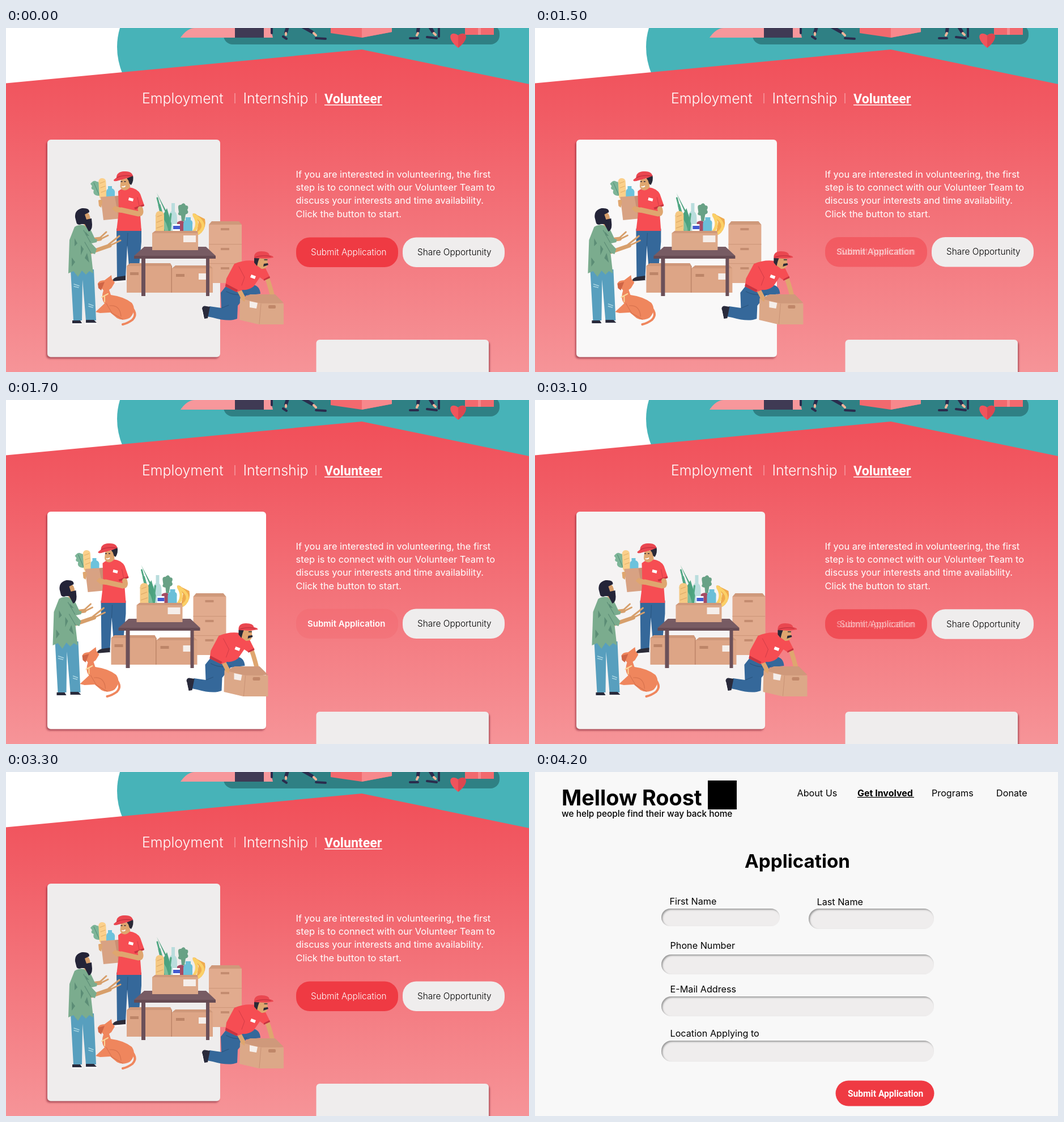
Write an HTML page that moves like this. It is 923 by 607 pixels and loops after 6000 ms.

```html
<!DOCTYPE html>
<html lang="en">
<meta charset="utf-8">
<title>Volunteer page</title>
<style>
html, body { margin: 0; width: 100%; height: 100%; overflow: hidden; background: #fff }
svg, #form { position: absolute; left: 0; top: 0; width: 923px; height: 607px }
text { font: 16.2px Inter, sans-serif }
.w { fill: #fff }
.tab { font-size: 24.9px; font-weight: 350 }
.tabOn { font: bold 23.2px Roboto, sans-serif }
.par text { font-size: 16.45px }
.btn { font-size: 15.4px; font-weight: 300 }
.b { font-weight: 700 }
.line { fill: none; stroke-linecap: round; stroke-linejoin: round }
#form { background: #f8f8f8 }
#form i { position: absolute; border-radius: 18px; background: #efeded; box-shadow: inset 2px 2px 3px #999 }
</style>

<svg viewBox="0 0 923 607">
  <defs>
    <linearGradient id="red" gradientUnits="userSpaceOnUse" x1="0" y1="38" x2="0" y2="607">
      <stop stop-color="#f14f59"/><stop offset=".2" stop-color="#f15b64"/><stop offset="1" stop-color="#f69498"/>
    </linearGradient>
    <filter id="sh" x="-5%" y="-5%" width="110%" height="110%">
      <feDropShadow dx="-2" dy="3" stdDeviation="1.5" flood-color="#7a2030" flood-opacity=".55"/>
    </filter>
    <filter id="sh2" x="-5%" y="-20%" width="110%" height="140%">
      <feDropShadow dx="2" dy="3" stdDeviation="1.5" flood-color="#7a2030" flood-opacity=".55"/>
    </filter>
  </defs>

  <!-- banner -->
  <path fill="#47b3b8" d="M201 0Q189 40 206 82L640 110H923V0Z"/>
  <rect x="384" y="-6" width="487" height="35" rx="16" fill="#2f8084"/>
  <path fill="#f7979b" d="M308 17Q320 0 333 0H404V17ZM455 0H467L471 17H455Z"/>
  <path fill="#3f3a54" d="M404 0H455V17H404Z"/>
  <path fill="#f2696e" d="M573 0H681V7L628 17 573 9ZM810 0H861V12H810Z"/>
  <path fill="#f7888c" d="M628 0H681V7L628 17ZM833 0H838V12H833Z"/>
  <g class="line" stroke-width="6">
    <path stroke="#2a2c4d" d="M497-2 494 8M524-2 540 7M728-2 727 6M748-2 753 6"/>
    <path stroke="#f2b59b" stroke-width="4" d="M494 9V12M543 9 547 13M727 9 725 13M755 9 758 12"/>
    <path stroke="#2a2c4d" stroke-width="4" d="M489 15 495 19M547 18 564 19M713 18H727M743 16 760 18M764 0V15M469 0V9"/>
  </g>
  <path fill="#f0545c" d="M798 35C775 17 785 3 798 13C811 3 821 17 798 35Z"/>
  <path fill="#dc4650" d="M798 35V13C811 3 821 17 798 35Z"/>

  <path fill="url(#red)" d="M0 97.5 628 38 923 99V607H0Z"/>
  <g class="w">
    <text class="tab" x="240" y="133">Employment</text>
    <text class="tab" x="418.5" y="133">Internship</text>
    <text class="tabOn" x="562" y="133">Volunteer</text>
    <path d="M562 135H664V136.4H562Z"/>
    <path opacity=".6" d="M403.5 115H404.5V133H403.5ZM546.5 115H547.5V133H546.5Z"/>
  </g>
  <g class="w par">
    <text x="511.5" y="264">If you are interested in volunteering, the first</text>
    <text x="511.5" y="287">step is to connect with our Volunteer Team to</text>
    <text x="511.5" y="310">discuss your interests and time availability.</text>
    <text x="511.5" y="333.5">Click the button to start.</text>
  </g>

  <rect id="card" x="73" y="197" height="383.5" rx="6" filter="url(#sh)"/>
  <rect x="547.5" y="550" width="304.5" height="80" rx="6" fill="#efeded" filter="url(#sh2)"/>

  <g id="buttons">
    <rect id="submit" x="512" y="369.5" width="180" height="52.5" rx="24" fill="#ef3a43"/>
    <text id="thin" class="btn w" x="538" y="401">Submit Application</text>
    <text id="bold" class="btn w" x="532" y="401" style="font-size:15px;font-weight:600">Submit Application</text>
    <rect id="share" x="700" y="369.5" width="180" height="52.5" rx="24"/>
    <text class="btn" x="726" y="401" style="font-weight:350">Share Opportunity</text>
  </g>

  <g id="art">
    <!-- stacked boxes -->
    <path fill="#e1ab8e" d="M358 347H416V450H358Z"/>
    <path fill="#cf997b" d="M358 347 363 341H411L416 347ZM358 381H416V382.3H358ZM358 415H416V416.3H358Z"/>
    <path fill="#c48c70" d="M379 353H394V357H379ZM379 388H394V392H379ZM379 422H394V426H379Z"/>

    <!-- standing volunteer -->
    <path fill="#35689a" d="M195 354H239V377L235 420H217L214 384 211 441H196Z"/>
    <path class="line" stroke="#2a557f" d="M215 362 214 384"/>
    <path fill="#2b2b38" d="M187 447Q190 440 197 439L211 437V446L190 449Z"/>
    <path fill="#fff" d="M187 447 211 445V448L187 450Z"/>
    <path fill="#7db598" d="M149 275Q155 267 160 271Q166 271 164 278L169 296H162Q152 294 155 286Q148 284 152 279Z"/>
    <path class="line" stroke="#518d75" d="M155 273 166 298"/>
    <rect x="164" y="265" width="13" height="38" rx="6" fill="#fbd08b" transform="rotate(-3 170 284)"/>
    <path class="line" stroke="#e3b06a" stroke-width="1.2" d="M166 274 174 271M167 282 175 279M168 290 176 287"/>
    <path fill="#6cc2dc" d="M180 279H187V283Q193 285 192 292V301H177V290Q177 285 180 284Z"/>
    <path fill="#d8a283" d="M167 298 199 296 204 336 172 339Z"/>
    <path fill="#c99074" d="M192 297 199 296 204 336 199 337Z"/>
    <path fill="#f64d53" d="M198 288Q206 281 217 281Q232 283 237 293L244 313 236 318 239 358H195L199 324Z"/>
    <path fill="#c73440" d="M226 317 243 311 244 314 228 320Z"/>
    <path class="line" stroke="#d23c47" d="M232 299 236 318V333"/>
    <path fill="#dfa66f" d="M203 267 218 265 219 281Q213 288 207 286Q200 284 202 274Z"/>
    <path fill="#292937" d="M213 265 224 260Q226 269 221 277L218 275 216 269Z"/>
    <path class="line" stroke="#292937" stroke-width="1.3" d="M203 271H205M209 271H211"/>
    <path class="line" stroke="#fff" stroke-width="1.8" d="M205 280Q208 281 210 279"/>
    <path fill="#ea4750" d="M195 264Q195 254 208 253Q222 252 224 261L214 265 199 269Q190 272 190 268Z"/>
    <path class="line" stroke="#bd303e" stroke-width="1.2" d="M196 264Q205 259 223 261"/>
    <path class="line" stroke="#dfa66f" stroke-width="9" d="M237 319Q240 328 234 328L203 321"/>
    <path fill="#dfa66f" d="M206 318 192 314 187 319 194 325 205 326ZM163 304Q170 301 170 307L168 317 164 314Z"/>
    <path fill="#fff" d="M217 299 225 301 224 306 216 304Z"/>

    <!-- boxes below the table -->
    <path fill="#dda586" d="M213 420H293V467H213ZM293 424H365V467H293Z"/>
    <path fill="#cf987a" d="M213 420 219 415H290L293 420ZM293 424 299 419H360L365 424Z"/>
    <path fill="#bd8568" d="M219 431H234V436H219ZM300 434H315V439H300ZM291.5 420H293V467H291.5Z"/>
    <path fill="#f5eeea" d="M340 433H353V444H340Z"/>

    <!-- groceries and table -->
    <path fill="#efab4e" d="M329 328Q334 326 337 330L351 337Q354 351 345 361Q337 369 327 366L337 358 340 342Z"/>
    <path class="line" stroke="#fbd067" stroke-width="5" d="M332 330Q351 342 347 353Q342 364 331 364M332 331Q342 347 330 361"/>
    <path fill="#68a185" d="M304 318Q303 311 309 312Q314 306 317 313Q324 313 320 321Q324 327 317 329L315 341H310L309 331Q301 330 305 325Z"/>
    <path fill="#a54b63" d="M302 343Q309 337 317 344V362H302Z"/>
    <path fill="#b9dddd" d="M292 309H298V324Q302 327 302 335V362H287V335Q287 327 292 323Z"/>
    <path fill="#4ca27f" d="M266 291 281 325 284 362H290L292 345 284 318 277 330 268 311 280 362H287L284 325Z"/>
    <path class="line" stroke="#50a783" stroke-width="3" d="M267 300 283 362M271 312 285 362M291 328 287 362"/>
    <path fill="#7dbe9d" d="M281 361Q276 340 263 331L274 333Q285 342 287 362Z"/>
    <path fill="#fff" d="M294 346H307V361H294Z"/>
    <path fill="#435bd0" d="M295 349H307V355H295Z"/>
    <path fill="#6bbfd8" d="M317 334H326V339Q330 340 329 347V363H313V347Q313 340 317 339Z"/>
    <rect x="264" y="323" width="15" height="45" rx="7" fill="#f5c883"/>
    <path class="line" stroke="#dca765" stroke-width="1.2" d="M267 333 275 330M266 343 276 339M266 353 277 349"/>
    <path fill="#775b63" d="M244 386H353L370 402H226Z"/>
    <path fill="#664b53" d="M226 402H370V407H226Z"/>
    <path fill="#6b5059" d="M239 407H246V473H239ZM353 407H359V473H353Z"/>
    <path fill="#dda98a" d="M258 362H339V392H258Z"/>
    <path fill="#cf987a" d="M258 362 263 358H337L339 362Z"/>
    <path fill="#f5eeea" d="M313 366H335V378H313Z"/>

    <!-- man receiving food -->
    <path fill="#589fbe" d="M114 426H155L159 516H141L135 444 134 516H119Z"/>
    <path class="line" stroke="#a9d5e2" stroke-width="1.5" d="M120 452 129 455M120 456 128 458M146 487 154 490M146 491 153 493"/>
    <path fill="#292a3b" d="M117 516H131L134 521H117ZM141 515H155L160 520H141Z"/>
    <path class="line" stroke="#fff" stroke-width="1.5" d="M117 522H134M140 522H160"/>
    <path class="line" stroke="#d79f6b" stroke-width="7" d="M151 374 166 372M151 395 183 384"/>
    <path class="line" stroke="#d79f6b" stroke-width="3" d="M165 371 177 360M168 372 180 366M181 382 200 367M183 384 202 375"/>
    <path fill="#7bac8e" d="M121 351Q136 342 149 355L157 372 161 373 160 378 151 380 160 390 157 399 150 397 154 433 147 429 141 435 134 428 127 439 119 429 110 433 112 374Z"/>
    <path fill="#5c8d76" d="M121 371 126 380 121 385ZM143 397 147 414 139 406ZM116 405 122 413 116 421ZM132 383 137 390 132 401ZM140 359 147 367 141 366Z"/>
    <path class="line" stroke="#5c8d76" stroke-width="1.2" d="M150 397 139 378M137 357 149 378"/>
    <path fill="#d79f6b" d="M137 325Q147 322 149 337L151 342 142 352 134 343Z"/>
    <path fill="#242438" d="M122 334Q121 321 134 318Q148 317 147 325L139 329 142 338 151 336 152 347Q152 357 146 359L139 346 133 346Q125 349 124 342Z"/>

    <!-- dog -->
    <path class="line" stroke="#ef865d" stroke-width="4" d="M221 492Q233 505 223 515Q215 521 206 523"/>
    <path fill="#ef865d" d="M162 451Q164 445 174 445L186 436 187 443 192 449 186 459 182 462 185 471Q208 474 222 485Q231 498 219 511Q207 518 196 512L184 502 166 503 158 501 174 486Q167 478 172 463Z"/>
    <path fill="#cf6546" d="M162 451 174 448 168 463 163 459Z"/>
    <path class="line" stroke="#fbd699" stroke-width="2" d="M169 475 180 469M174 474V483"/>
    <path class="line" stroke="#d8734f" stroke-width="1.2" d="M183 490Q201 488 203 509M177 486 187 503 206 514"/>

    <!-- kneeling volunteer -->
    <path fill="#35689a" d="M391 452Q424 465 436 453Q448 455 449 469L424 472 409 490 408 513Q393 519 365 511L355 509 359 491 380 494 379 467Z"/>
    <path class="line" stroke="#2a557f" stroke-width="1.2" d="M389 465Q406 474 425 469M381 494 393 489"/>
    <path fill="#292a3b" d="M346 495Q347 489 354 491L360 492 356 512 350 513Z"/>
    <path class="line" stroke="#fff" stroke-width="1.5" d="M346 498 349 513"/>
    <path class="line" stroke="#dfa66f" stroke-width="8" d="M458 434Q464 448 470 472M408 456 418 475"/>
    <path fill="#f64d53" d="M403 416Q422 408 440 411L458 424 466 440 455 445 448 440 437 456Q428 463 418 462L407 466 387 456 389 442Z"/>
    <path fill="#c73440" d="M388 451 409 462 407 466 387 456ZM455 443 465 438 466 441 455 446Z"/>
    <path class="line" stroke="#d23c47" d="M411 421 421 440 416 454"/>
    <path fill="#dfa66f" d="M442 407 461 405 462 417Q460 426 451 425L440 417Z"/>
    <path fill="#292937" d="M438 406 448 404 445 412 443 420 438 414ZM455 416 462 415 463 418 454 421Z"/>
    <path class="line" stroke="#292937" stroke-width="1.3" d="M456 409H461"/>
    <path fill="#ea4750" d="M438 406Q437 394 451 394Q464 394 465 401Q472 402 472 405L459 407Z"/>
    <path class="line" stroke="#bd303e" stroke-width="1.2" d="M439 405Q451 400 467 403"/>
    <path fill="#fff" d="M433 435 441 438 439 443 431 440Z"/>
    <path fill="#cf997b" d="M414 478 431 470H475L490 485 450 489Z"/>
    <path fill="#dca888" d="M413 477 450 486H490V523H446L412 515Z"/>
    <path class="line" stroke="#c99275" d="M450 487 447 522"/>
    <path fill="#f5eeea" d="M430 482 444 485 442 495 430 493Z"/>
    <rect x="463" y="489" width="13" height="6" rx="2" fill="#c08769"/>
    <path fill="#dfa66f" d="M413 470 422 474 421 483 414 478Z"/>
  </g>
</svg>

<div id="form">
  <svg viewBox="0 0 923 607">
    <text class="b" x="47" y="59" style="font-size:37.8px">Mellow Roost</text>
    <rect x="305" y="15" width="51" height="51"/>
    <text x="47" y="79" style="font-size:15.4px;font-weight:500">we help people find their way back home</text>
    <text x="462.5" y="43">About Us</text>
    <text class="b" x="569" y="43" style="font-size:16px">Get Involved</text>
    <path d="M569 44H669V45.3H569Z"/>
    <text x="700" y="43">Programs</text>
    <text x="814" y="43">Donate</text>
    <text class="b" x="463" y="169" text-anchor="middle" style="font-size:33.2px">Application</text>
    <text x="237.5" y="234">First Name</text>
    <text x="497.5" y="235">Last Name</text>
    <text x="238.5" y="312">Phone Number</text>
    <text x="238.5" y="389">E-Mail Address</text>
    <text x="238.5" y="467">Location Applying to</text>
    <rect x="530.5" y="544.5" width="174" height="45" rx="22.5" fill="#ef3a43"/>
    <text class="w" x="552" y="573" style="font:600 15.6px Roboto,sans-serif">Submit Application</text>
  </svg>
</div>

<script>
const $ = id => document.getElementById(id);

for (const [x, y, w, h] of [[223, 241, 209, 31], [483, 241, 221, 36],
    [223, 322, 481, 35], [223, 396, 481, 35], [223, 474, 481, 37]]) {
  const field = document.createElement('i');
  field.style.cssText = `left:${x}px;top:${y}px;width:${w}px;height:${h}px`;
  $('form').append(field);
}

// Eased progress of a 300 ms transition, advancing every 100 ms
function progress(t, start, lead) {
  if (t < start) return 0;
  const k = (Math.floor((t - start) / 100) * 100 + lead) / 300;
  return Math.sin(Math.min(1, k) * Math.PI / 2);
}

function draw(now) {
  const t = now % 6000;
  const p = progress(t, 1400, 24) - progress(t, 3000, 36);
  const shade = (a, b) => Math.round(a + (b - a) * p);
  $('card').setAttribute('width', 305 + 81 * p);
  $('card').setAttribute('fill', `rgb(${shade(239, 255)},${shade(237, 255)},${shade(237, 255)})`);
  $('art').setAttribute('transform', `translate(${-27.5 * p} 0)`);
  $('buttons').setAttribute('transform', `translate(0 ${-p})`);
  $('submit').setAttribute('opacity', 1 - 0.88 * p);
  $('thin').setAttribute('opacity', 1 - p);
  $('bold').setAttribute('opacity', p);
  const pressed = t >= 3800;
  $('share').setAttribute('fill', pressed ? '#ef4060' : '#efeded');
  $('share').setAttribute('opacity', pressed ? 0.12 : 1);
  $('form').style.display = t >= 4200 ? 'block' : 'none';
  requestAnimationFrame(() => draw(performance.now() - origin));
}
const origin = performance.now();
draw(0);
</script>
</html>
```
